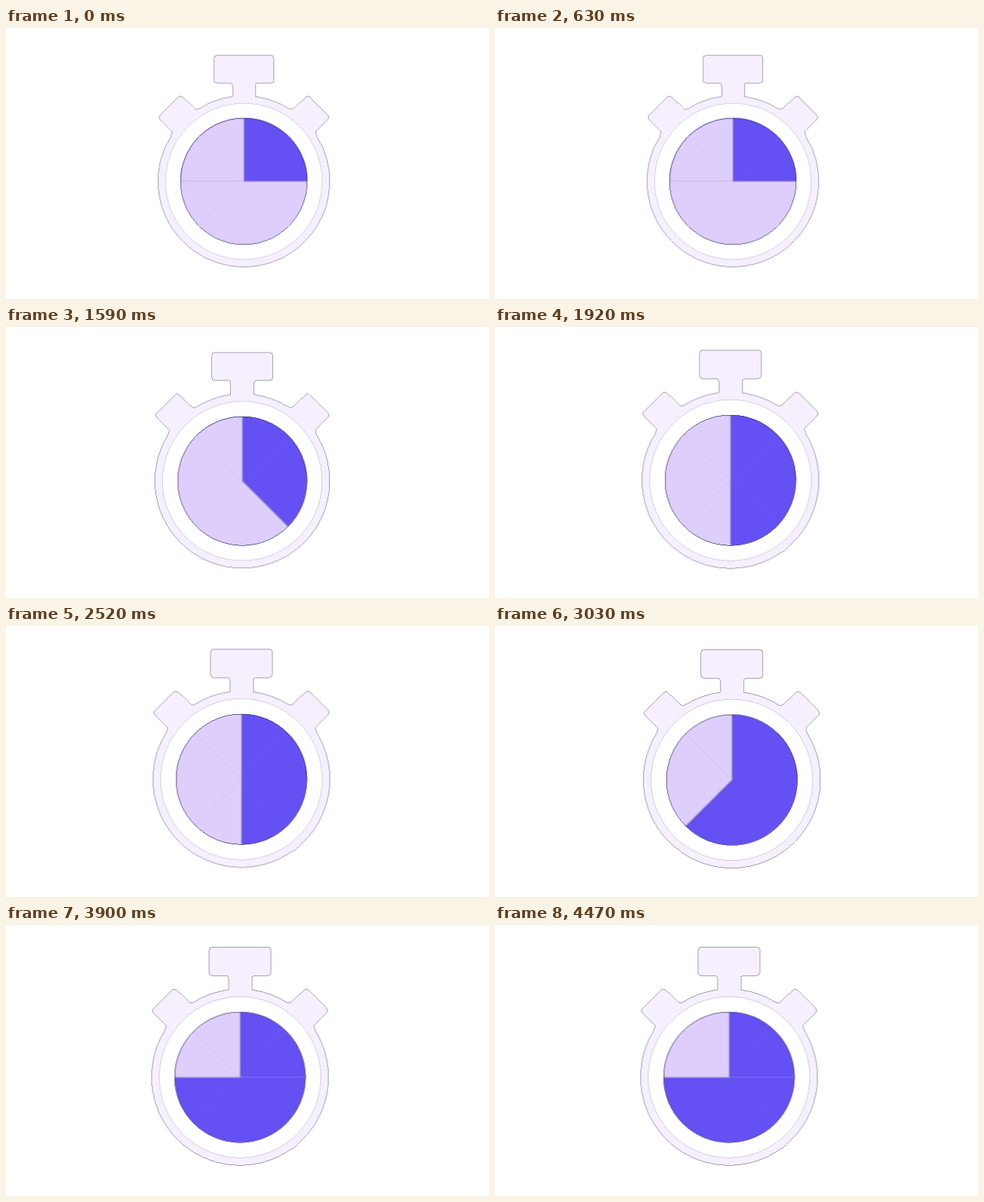
Animation, 640 px wide and 360 px high, one loop 4.5 s. Source, as an HTML page without scripts:

```html
<!DOCTYPE html>
<html lang="en">
<head>
<meta charset="utf-8">
<title>Stopwatch</title>
<style>
  html, body { margin: 0; width: 100%; height: 100%; overflow: hidden; background: #fff; }
  svg { display: block; width: 100vw; height: 100vh; }

  .watch, .hand { animation: 4.5s step-end infinite; }
  .watch { animation-name: pose; }
  .hand { animation-name: turn; }

  .case, .gap, .rim { shape-rendering: crispEdges; }
  .case { fill: #f6f0fe; stroke: #6b6585; stroke-width: .6; }
  .gap { fill: #fff; stroke: #bdb4cd; stroke-width: .6; }
  .rest { fill: #ddcefb; }
  .done { fill: #6450f3; }
  .spokes { stroke: #a08fd0; opacity: .12; }
  .edge { stroke: #a89ac8; stroke-width: 1.5; opacity: .75; }
  .rim { fill: none; stroke: #383166; stroke-width: .7; }

  /* The watch jumps to a new place and size every 0.9 s */
  @keyframes pose {
    0%   { transform: translate(315.2px, 203.7px); }
    20%  { transform: translate(313.1px, 204.6px) scale(1.019); }
    40%  { transform: translate(312px, 203.6px) scale(1.031); }
    60%  { transform: translate(313.9px, 204.4px) scale(1.032); }
    80%, 100% { transform: translate(310.1px, 202.2px) scale(1.031); }
  }
  /* The dial fills in eighths */
  @keyframes turn {
    0%   { transform: rotate(90deg); }
    20%  { transform: rotate(135deg); }
    40%  { transform: rotate(180deg); }
    60%  { transform: rotate(225deg); }
    80%, 100% { transform: rotate(270deg); }
  }
</style>
</head>
<body>
<svg viewBox="0 0 640 360">
  <g class="watch">
    <path class="case" d="M-15-112.7V-126.5Q-15-131-19-131H-36Q-39.5-131-39.5-134.5V-164Q-39.5-167.5-36-167.5H36Q39.5-167.5 39.5-164V-134.5Q39.5-131 36-131H19Q15-131 15-126.5V-112.7
      A113.7 113.7 0 0 1 60.5-96.2Q64-95 66-97L82.5-112.5Q85-115 87.5-112.5L111.5-88.5Q114-86 111.5-83.5L96-68Q94-66 97-59.5
      A113.7 113.7 0 1 1-97-59.5Q-94-66-96-68L-111.5-83.5Q-114-86-111.5-88.5L-87.5-112.5Q-85-115-82.5-112.5L-66-97Q-64-95-60.5-96.2
      A113.7 113.7 0 0 1-15-112.7Z"/>
    <circle class="gap" r="103.8"/>
    <circle class="rest" r="84"/>
    <!-- A turning half, completed by the first quarter and hidden behind the last -->
    <path class="done hand" d="M0-84A84 84 0 0 0 0 84Z"/>
    <path class="done" d="M0 0V-84A84 84 0 0 1 84 0Z"/>
    <path class="rest" d="M0 0V-84A84 84 0 0 0-84 0Z"/>
    <path class="spokes" d="M-59-59L59 59M-59 59L59-59"/>
    <path class="edge" d="M0 0V-83.5"/>
    <path class="edge hand" d="M0 0V-83.5"/>
    <circle class="rim" r="84"/>
  </g>
</svg>
</body>
</html>
```
